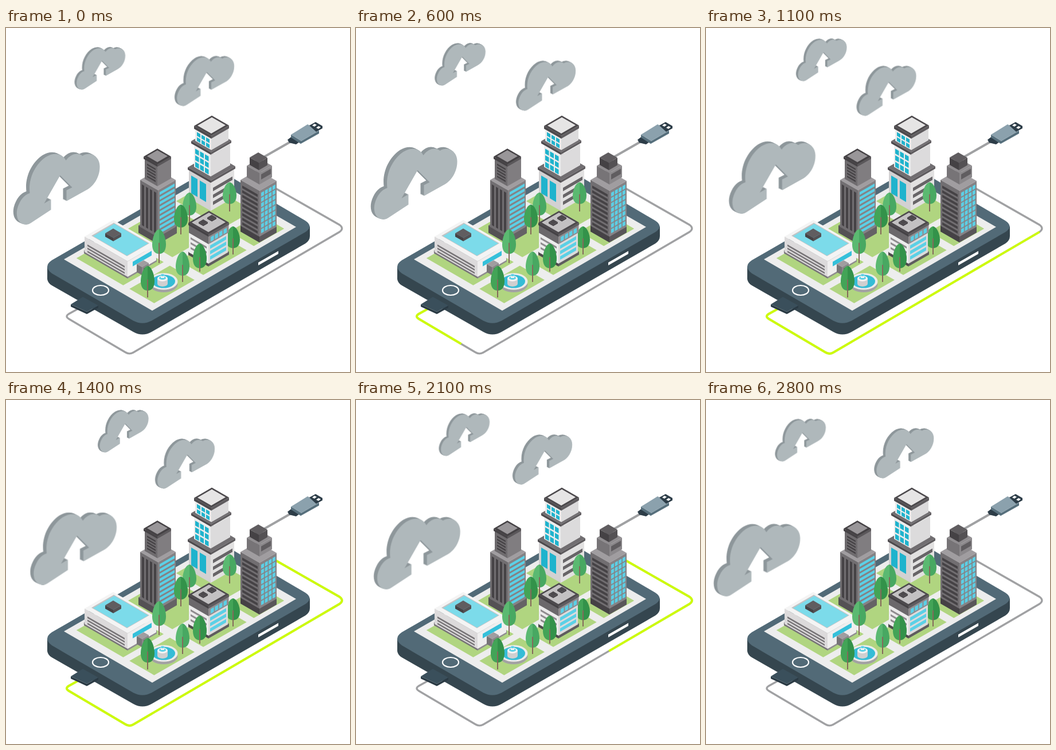
Animation, 600 px wide and 600 px high, one loop 2.9 s. Source, as an HTML page:

```html
<!DOCTYPE html>
<html lang="en">
<head>
<meta charset="utf-8">
<title>City on a phone</title>
<style>
html, body { margin: 0; width: 100%; height: 100%; overflow: hidden; background: #fff; }
svg { display: block; width: 100vw; height: 100vh; }
.cloud { animation: drift 2900ms infinite; }
.charge { stroke-dasharray: 1 2; stroke-dashoffset: 1; animation: charge 2900ms infinite linear; }
.lit { fill: #84d860; opacity: 0; animation: blink 2900ms infinite step-end; }
@keyframes drift {
  0% { transform: none; animation-timing-function: cubic-bezier(.35, .03, .63, 1); }
  46.5% { transform: translate(var(--x), var(--y)); }
  51% { transform: translate(var(--x), var(--y)); animation-timing-function: cubic-bezier(.35, 0, .67, .96); }
  100% { transform: none; }
}
@keyframes charge {
  0%, 16.9% { stroke-dashoffset: 1; animation-timing-function: cubic-bezier(.333, .4, .667, .733); }
  44.5%, 60% { stroke-dashoffset: 0; }
  81.7%, 100% { stroke-dashoffset: -1; }
}
@keyframes blink {
  0% { opacity: 0; }
  24.1% { opacity: 1; }
  31% { opacity: 0; }
  86.2% { opacity: 1; }
  93.1%, 100% { opacity: 0; }
}
</style>
</head>
<body>
<svg viewBox="0 0 600 600">
  <defs>
    <path id="cable" fill="none" pathLength="1" d="M127 489L109 499Q103 503 109 507L208 565.500Q215 570 222 566L582 355.500Q590 349.500 582 343.500L469 279"/>
    <path id="puff" d="M36 343C23 343 17 331 20 316C24 301 32 291 42 288C39 263 51 238 70 225C85 216 99 219 105 231C113 220 125 216 134 223C148 214 165 224 164 243C164 260 153 277 140 283L106 302V283L116 278L95 257L67 306L79 299V317L44 340Q40 343 36 343Z"/>
  </defs>

  <use href="#cable" stroke="#a0a1a3" stroke-width="3.300"/>
  <use href="#cable" class="charge" stroke="#cdfb0b" stroke-width="4"/>

  <g id="usb">
    <path d="M448 226L497 198" stroke="#a0a1a3" stroke-width="4"/>
    <path fill="#2d3d48" d="M491 195L500 188L514 197L506 203L494 200Z"/>
    <path fill="#566f7c" d="M497 186L515 197L546 179V184L514 202L497 191Z"/>
    <path fill="#8ba1ad" d="M497 186L526 168L546 179L515 197Z"/>
    <path fill="#2d3d48" d="M529 170L540 164L552 171V175L541 181Z"/>
    <path fill="#fff" d="M534 170L538 167L542 169L538 172ZM541 174L545 171L549 173L545 176Z"/>
  </g>

  <g id="phone">
    <path fill="#35464f" d="M72 417V438Q73 445 80 449L222 530Q238 539 254 530L522 376Q530 371 530 363V346Z"/>
    <path fill="#526a77" d="M80 405L345 252Q362 243 379 252L522 336Q537 346 522 356L254 510.500Q238 519 222 510.500L80 428Q64 416 80 405Z"/>
    <path fill="#ededed" d="M101 403.500L353 259L506 347L255 493Z"/>
    <g id="lawns" fill="#b0d580"></g>
    <ellipse cx="165" cy="457.500" rx="14" ry="8.500" fill="none" stroke="#fff" stroke-width="2.200"/>
    <path fill="#fff" d="M440 409L475 389V394L440 414Z"/>
    <path fill="#2a3a44" d="M113 482L141 495L161 484V488L141 499L113 486Z"/>
    <path fill="#3a4f5b" d="M113 482L134 469L161 484L141 495Z"/>
  </g>
  <g id="city"></g>
  <g id="sky"></g>
</svg>
<script>
const $ = id => document.getElementById(id);
const TAN = Math.tan(Math.PI / 6);
const TEAL = '#1fb3cd', SKY = '#5bd0e6', DARK = '#4d4a4d', INK = '#454245', GREY = '#8b888b';
const white = ['#f1f1f1', '#ececec', '#dcdbdc'];
const shaded = ['#f1f1f1', '#d3d1d2', '#e2e1e1'];
const slate = ['#716e71', DARK, '#5f5c5f'];

const path = (fill, d) => `<path fill="${fill}" d="${d}"/>`;
const rect = (x, y, w, h, fill) => `<rect x="${x}" y="${y}" width="${w}" height="${h}" fill="${fill}"/>`;

// Rows and columns of panes; glow(col, row) picks those that light up.
function grid(x, y, cols, rows, dx, dy, w, h, fill, glow) {
  let s = '';
  for (let r = 0; r < rows; r++) for (let c = 0; c < cols; c++) {
    const px = x + c * dx, py = y + r * dy;
    s += rect(px, py, w, h, fill);
    if (glow && glow(c, r)) s += `<rect class="lit" x="${px}" y="${py}" width="${w}" height="${h}"/>`;
  }
  return s;
}

function diamond(x, y, a, b, fill) {
  return path(fill, `M${x} ${y}l${-a} ${-a * TAN}l${b} ${-b * TAN}l${a} ${a * TAN}Z`);
}

// Isometric block: (x, y) is the front top corner, a and b the widths to the left and right.
function box(x, y, a, b, h, [top, left, right], onLeft = '', onRight = '') {
  return diamond(x, y, a, b, top) +
    `<g transform="translate(${x - a} ${y - a * TAN}) skewY(30)">${rect(0, 0, a + .2, h, left)}${onLeft}</g>` +
    `<g transform="translate(${x} ${y}) skewY(-30)">${rect(0, 0, b, h, right)}${onRight}</g>`;
}

function tree(x, top, h, ground, dark) {
  const [l, r] = dark ? ['#43a457', '#33924a'] : ['#5bb971', '#48a862'];
  const half = s => `M${x} ${top}C${x + 7 * s} ${top + 1} ${x + 12 * s} ${top + h * .36} ${x + 12 * s} ${top + h * .62}` +
    `C${x + 12 * s} ${top + h * .87} ${x + 7 * s} ${top + h} ${x} ${top + h}Z`;
  return path(l, half(-1)) + path(r, half(1)) + rect(x - 1, top + h * .55, 2, ground - top - h * .55, '#84695a');
}

function whiteTower() {
  const glow = (c, r) => (c * 2 + r) % 3 == 1;
  return box(357, 268, 38, 41, 51, shaded,
      grid(4, 9, 2, 1, 15, 0, 11, 31, TEAL, c => c == 1),
      grid(4, 13, 1, 3, 0, 12, 34, 6, '#676467')) +
    box(357, 266, 40, 43, 4, slate) +
    box(357, 222, 29, 34, 37, white, grid(2, 4, 3, 3, 8.5, 11.5, 6.5, 8.5, TEAL, glow)) +
    box(357, 217, 34, 36, 4, slate) +
    box(358, 191, 28, 30, 22, white, grid(3, 5, 3, 2, 8, 9, 6, 6.5, TEAL, glow)) +
    box(358, 188, 30, 31, 5, [DARK, DARK, '#5f5c5f']) +
    diamond(358, 184, 24, 25, '#e6e5e5');
}

function greyTower() {
  return box(265, 364, 34, 33, 13, ['#777477', '#545154', '#656265']) +
    box(265, 283, 31, 31, 82, ['#a09da0', '#716e71', '#858285'],
      grid(3, 6, 4, 1, 7, 0, 4, 71, INK),
      grid(3, 5, 1, 9, 0, 8.4, 26, 5, SKY)) +
    box(264, 240, 22, 24, 36, ['#777477', '#6e6b6e', '#807d80'], grid(4, 7, 1, 5, 0, 5.2, 15, 2.6, INK)) +
    box(264, 238, 24, 24, 4, [INK, INK, '#5a575a']) +
    diamond(264, 234, 18, 18, '#999699');
}

function darkTower() {
  return box(442, 284, 33, 30, 90, ['#a09da0', '#716e71', '#858285'],
      grid(3, 8, 1, 9, 0, 8, 27, 4.5, INK) + rect(0, 80, 33, 10, INK),
      grid(3, 5, 4, 8, 6.6, 9.1, 5, 7, SKY, (c, r) => (c * 3 + r * 2) % 5 < 2) + rect(0, 80, 30, 10, '#5a575a')) +
    box(442, 253, 22, 22, 20, ['#8f8c8f', '#777477', GREY], '', rect(3, 4, 17, 9, '#605d60')) +
    box(441, 235, 16, 15, 13, ['#605d60', INK, '#545154']);
}

function shop() {
  return box(353, 411, 35, 36, 5, slate) +
    box(353, 376, 34, 34, 35, white,
      grid(3, 7, 1, 3, 0, 8.5, 28, 3.4, '#8f8c8f'),
      grid(3, 5, 1, 3, 0, 9.5, 28, 6, SKY, (c, r) => r != 1)) +
    box(353, 361, 34, 35, 16, [GREY, '#6b686b', '#8f8c8f'], '',
      grid(4, 6, 4, 1, 7.5, 0, 5.5, 8, SKY, c => c < 2)) +
    box(353, 360, 35, 36, 4, [DARK, INK, '#5f5c5f']) +
    diamond(353, 356, 29, 30, '#c3c1c2') +
    box(344, 343, 8, 8, 2.5, [DARK, INK, INK]) + box(359, 335, 8, 8, 2.5, [DARK, INK, INK]);
}

function library() {
  return box(212, 432, 76, 51, 5, ['#888', '#777477', '#8f8c8f']) +
    box(212, 407, 75, 50, 27, ['#f4f4f4', '#dcdadb', '#efeeee'],
      grid(5, 11, 1, 3, 0, 5.4, 65, 2.8, '#777477'),
      grid(9, 6, 1, 1, 0, 0, 33, 8, '#35c0da', () => 1)) +
    diamond(211, 398, 62, 39, '#c4c3c4') +
    diamond(211, 397, 59, 37, '#7cdbea') +
    box(187, 366, 14, 14, 6, ['#605d60', INK, '#545154']) +
    box(237, 417, 9, 12, 14, ['#a09da0', '#777477', GREY], '', rect(3, 4, 6, 10, '#5a575a'));
}

function fountain() {
  const ring = (y, rx, ry, fill, x = 275) => `<ellipse cx="${x}" cy="${y}" rx="${rx}" ry="${ry}" fill="${fill}"/>`;
  return ring(447, 24.5, 14, '#a3a1a3') + ring(442, 24.5, 14.5, '#ececec') + ring(442, 20, 11.5, '#35bcd6') +
    ring(446, 9, 5, '#d0cfd0', 273) + rect(264, 437, 18, 9, '#d0cfd0') + ring(437, 9, 5, '#f5f5f5', 273) +
    ring(436, 6, 3, SKY, 273) + rect(270, 431, 6, 5, '#f2f2f2') + ring(431, 3, 2, SKY, 273);
}

$('city').innerHTML = whiteTower() + greyTower() +
  tree(320, 287, 40, 345) + tree(305, 308, 40, 360, 1) + tree(390, 269, 38, 320) +
  darkTower() + tree(396, 346, 38, 395, 1) + library() + tree(267, 351, 43, 410) +
  shop() + fountain() + tree(247, 415, 43, 470, 1) + tree(308, 390, 42, 443) + tree(338, 376, 43, 425, 1);

const at = (u, v) => `${101 + 252 * u + 154 * v} ${403.5 - 144.5 * u + 89 * v}`;
let lawns = '';
for (const [a, b] of [[.05, .33], [.39, .69], [.74, .95]])
  for (const [c, d] of [[.06, .59], [.66, .94]])
    lawns += `<path d="M${at(a, c)}L${at(b, c)}L${at(b, d)}L${at(a, d)}Z"/>`;
$('lawns').innerHTML = lawns;

function cloud(x, y, size, dx, dy) {
  let s = '';
  for (let k = 6; k >= 0; k--)
    s += `<use href="#puff" x="${-k}" y="${-k / 2}" fill="${k ? '#8e979b' : '#afb8bb'}"/>`;
  return `<g class="cloud" style="--x:${dx}px;--y:${dy}px">` +
    `<g transform="translate(${x} ${y}) scale(${size}) translate(-14 -216)">${s}</g></g>`;
}
$('sky').innerHTML = cloud(120, 33, .587, 40.5, -16) + cloud(294.5, 48.5, .69, -34, 18.5) + cloud(13.5, 216, 1, 29.5, -20.5);
</script>
</body>
</html>
```
